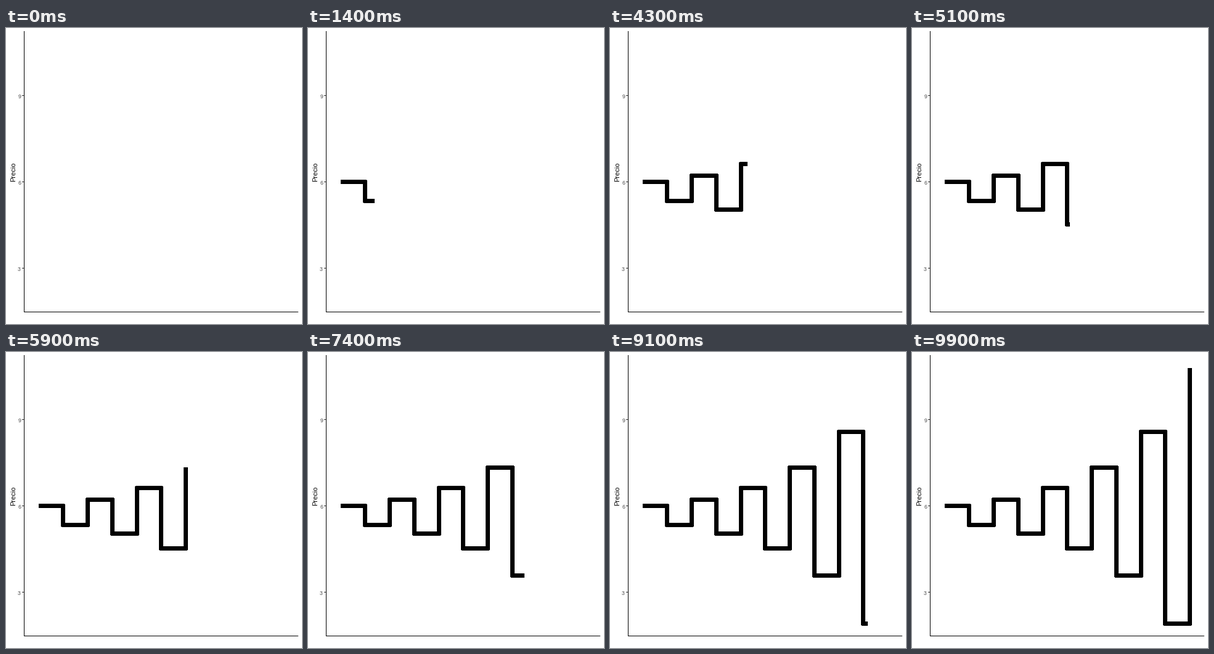
Recreate the animation shown at these times as a matplotlib script. Size 480 px wide and 480 px high, loop 10000 ms.

```python
import math

import matplotlib.pyplot as plt
from matplotlib.animation import FuncAnimation

SIZE, DPI = 480, 72
FRAMES, STEPS = 100, 10
X0, X_STEP = 53, 39.75
Y6, UNIT = 249.5, 46.63      # height of price 6, pixels per price unit
FONT = "Liberation Sans"


def price(i):
    """Diverging cobweb around the equilibrium 40/7."""
    return 40 / 7 + 2 / 7 * (-4 / 3) ** i


def centre(v):
    """Snap to the middle of a pixel."""
    return math.floor(v) + 0.5


knots = [math.floor((FRAMES - 1) * i / STEPS + 0.5) for i in range(STEPS + 1)]
col = [X0] + [centre(X0 + X_STEP * i) for i in range(1, STEPS + 1)]
row = [centre(Y6 - (price(i) - 6) * UNIT) for i in range(STEPS + 1)]

fig = plt.figure(figsize=(SIZE / DPI, SIZE / DPI), dpi=DPI, facecolor="white")
ax = fig.add_axes([0, 0, 1, 1])
ax.set_xlim(0, SIZE)
ax.set_ylim(SIZE, 0)
ax.axis("off")


def stroke(xs, ys, width=1, color="black"):
    line, = ax.plot(xs, ys, color=color, lw=width, antialiased=False,
                    solid_capstyle="butt", solid_joinstyle="round")
    line.set_snap(False)
    return line


for value in (3, 6, 9):
    y = centre(Y6 - (value - 6) * UNIT)
    stroke([26, 29], [y, y], color="#333333")
    ax.text(24, y + 4.5, str(value), family=FONT, size=8.8, color="#4d4d4d",
            ha="right", va="baseline")
stroke([29.5, 29.5], [5, 461])
stroke([29, 474], [460.5, 460.5])
ax.text(15, 233.5, "Precio", family=FONT, size=11, color="black", rotation=90,
        rotation_mode="anchor", ha="center", va="baseline")

path = stroke([], [], width=7)


def draw(frame):
    if frame == 0:
        path.set_data([], [])
        return [path]
    done = max(i for i, k in enumerate(knots) if k <= frame)
    xs, ys = [X0], [row[0]]
    for i in range(1, done + 1):
        xs += [col[i], col[i]]
        ys += [row[i - 1], row[i]]
    if frame == knots[done]:
        ys[-1] = math.floor(ys[-1])
    else:
        part = (frame - knots[done]) / (knots[done + 1] - knots[done])
        xs.append(math.floor(X0 + X_STEP * (done + part)))
        ys.append(row[done])
    path.set_data(xs, ys)
    return [path]


anim = FuncAnimation(fig, draw, frames=FRAMES, interval=100, repeat=True,
                     repeat_delay=0, blit=False)
plt.show()
```
